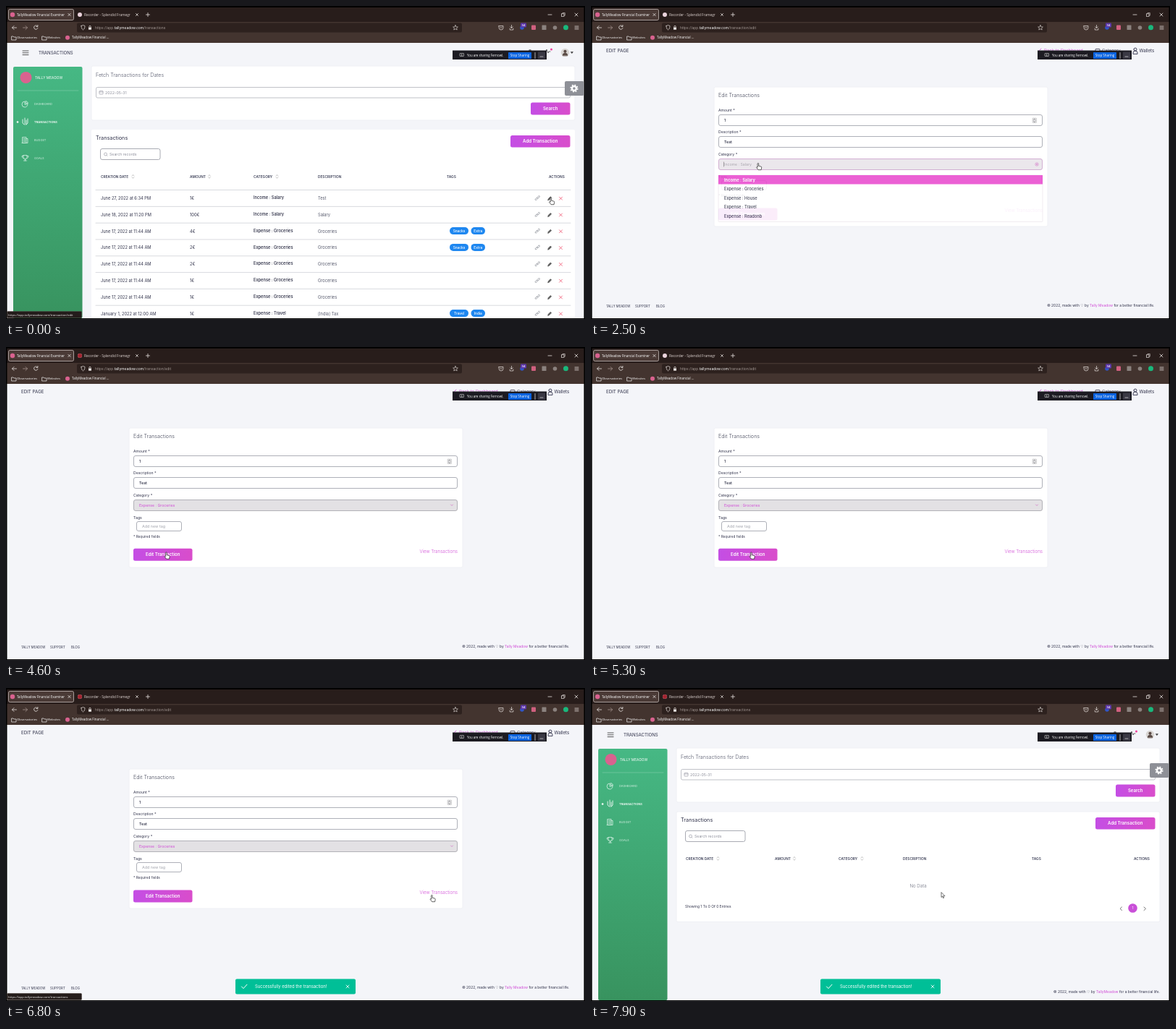
Write an HTML page that moves like this. It is 800 px wide and 433 px high and loops after 8 s.

```html
<!DOCTYPE html>
<html lang="en">
<head>
<meta charset="utf-8">
<title>Transactions</title>
<style>
html, body { margin: 0; width: 100%; height: 100%; overflow: hidden; background: #000; }
svg { display: block; width: 800px; height: 433px; }
text { font-family: Inter, sans-serif; white-space: pre; }
.ui text { font-family: "Open Sans", sans-serif; }
.heart { font-family: "DejaVu Sans", sans-serif; }
</style>
</head>
<body>
<svg id="stage" viewBox="0 0 800 433"></svg>
<script>
const INK = '#30324a', GREY = '#8d8f9b', PINK = '#d04bd6', LOGO = '#d9628f';

// y is the vertical middle of the text
const text = (x, y, s, size, fill = INK, weight = 400, anchor = 'start') =>
  `<text x="${x}" y="${y + size * .36}" font-size="${size}" fill="${fill}" font-weight="${weight}" text-anchor="${anchor}">${s}</text>`;
const rect = (x, y, w, h, fill, r = 0, stroke = 'none', sw = .8) =>
  `<rect x="${x}" y="${y}" width="${w}" height="${h}" rx="${r}" fill="${fill}" stroke="${stroke}" stroke-width="${sw}"/>`;
const dot = (x, y, r, fill) => `<circle cx="${x}" cy="${y}" r="${r}" fill="${fill}"/>`;
const ring = (x, y, r, stroke, sw = .6, extra = '') =>
  `<circle cx="${x}" cy="${y}" r="${r}" fill="none" stroke="${stroke}" stroke-width="${sw}" ${extra}/>`;
const line = (d, stroke, sw = .8, fill = 'none') =>
  `<path d="${d}" fill="${fill}" stroke="${stroke}" stroke-width="${sw}" stroke-linecap="round" stroke-linejoin="round"/>`;
const cross = (x, y, r, stroke, sw) =>
  line(`M${x - r} ${y - r}l${2 * r} ${2 * r}m0 ${-2 * r}l${-2 * r} ${2 * r}`, stroke, sw);
const group = (id, body, attrs = '') => `<g id="${id}" ${attrs}>${body}</g>`;
const card = (x, y, w, h) => rect(x, y, w, h, '#fff', 2, '#eff0f5', 1);
const button = (x, y, w, h, label) =>
  rect(x, y, w, h, 'url(#pink)', 2.5) + text(x + w / 2, y + h / 2, label, 6.1, '#fff', 600, 'middle');
const credit = (x, y, name) =>
  text(x, y, `© 2022, made with <tspan class="heart">♡</tspan> by <tspan fill="${PINK}">${name}</tspan> for a better financial life.`, 4.9, INK, 400, 'end');
const url = path =>
  text(123, 30, `https://app.<tspan fill="#fff">tallymeadow.com</tspan>/${path}`, 4.9, '#a39894');
const status = path =>
  rect(1.5, 422.5, 103, 9, '#241c1b', 1, '#4c403d', .5) + text(3, 427.5, 'https://app.tallymeadow.com/' + path, 4.2, '#eee');
const folder = x => line(`M${x} 42h2l1 1h3v4h-6z`, '#eee', .7);

function browser() {
  const c = '#e8e2e0';
  return rect(1.5, 2, 797, 20, '#281d1b') + rect(1.5, 22, 797, 29, '#43342f') +
    rect(3.5, 4.5, 90, 15, '#4a3a36', 2, '#d8cfcc', .7) +
    dot(9, 12, 3.2, LOGO) + text(15, 12, 'TallyMeadow Financial Examiner', 4.4, '#fff') + cross(87.5, 12, 1.6, c) +
    dot(102, 12, 3, '#ead3dc') + group('rec', dot(102, 12, 3, '#a32430')) +
    text(108, 12, 'Recorder - Splendid Framegr', 4.8, '#ddd3d0') + cross(181, 12, 1.5, c) +
    line('M196 9.5v5m-2.5-2.5h5', c) +
    line('M749 12h5', c) + rect(767.5, 10.8, 3.5, 3.5, 'none', 0, c, .7) + line('M769 10.5v-1h3.3v3.6h-1', c, .6) + cross(788, 12, 2, c) +
    line('M14.5 30h-6m2.5-2.5l-2.5 2.5l2.5 2.5', c) + line('M23.5 30h6m-2.5-2.5l2.5 2.5l-2.5 2.5', '#a4938e') +
    line('M43.5 28a2.7 2.7 0 1 0 .4 2.5m0-4v2h-2', c) +
    rect(98, 23.5, 532, 13, '#2d211e', 2) +
    line('M104 27.5l2.5-1l2.5 1c0 3-1 4.5-2.5 5.5c-1.5-1-2.5-2.5-2.5-5.5z', c, .7) +
    rect(114, 29.5, 4, 3.3, c, .5) + line('M114.8 29.5v-1a1.2 1.2 0 0 1 2.4 0v1', c, .7) +
    line('M621 26.5l1 2.3l2.4.2l-1.8 1.6l.6 2.4l-2.2-1.3l-2.2 1.3l.6-2.4l-1.8-1.6l2.4-.2z', c, .6) +
    line('M681 27.5h6v2.5a3 3 0 0 1-6 0zm1.5 1.7l1.5 1.4l1.5-1.4', c, .7) +
    line('M698.5 26.5v4m-1.7-1.7l1.7 1.7l1.7-1.7m-4 2.2v2h4.6v-2', c, .7) +
    dot(713, 30, 2.8, '#3155c6') + rect(711, 23.5, 8, 6, '#5a34a8', 1) + text(715, 26.5, '34', 4.3, '#fff', 600, 'middle') +
    rect(726, 26.5, 6, 6.5, '#d0607f', 1) + rect(740.5, 26.5, 6, 6.5, '#8b827f', .5) + dot(758.5, 30, 2.8, '#8b827f') +
    dot(773.5, 29.7, 3.5, '#19b87c') + line('M786 28h5m-5 2h5m-5 2h5', c, .7) +
    folder(8) + text(15, 43.8, 'Observatories', 4.3, '#fff') + folder(50) + text(57, 43.8, 'Websites', 4.3, '#fff') +
    dot(85, 43.8, 3, LOGO) + text(91, 43.8, 'TallyMeadow Financial ...', 4.5, '#fff');
}

function shareBar() {
  return rect(617, 61.5, 130, 12.5, '#1c1b22') + rect(627, 65.5, 5.5, 4, 'none', .5, '#ddd', .6) +
    line('M629.7 69v-2m-1 1l1-1l1 1', '#ddd', .5) + text(637, 68, 'You are sharing Fernowl.', 4.4, '#fff') +
    rect(694, 64, 32, 9, '#0a63e0', .5) + text(710, 68.5, 'Stop Sharing', 4.5, '#fff', 400, 'middle') +
    line('M731 64.5v8', '#eee', .7) + rect(735, 63.5, 10, 9.5, '#3a3944', .5) + line('M738 70h4', '#ddd', .7);
}

function sidebar() {
  const items = [['DASHBOARD', 135.5], ['TRANSACTIONS', 160.5], ['BUDGET', 185.5], ['GOALS', 210.5]];
  const icons = [
    'M30 136a4 4 0 1 1-4-4v4zm-2.5-4.5a4 4 0 0 1 3 3h-3z',
    'M23 157v5l2 2m1-9v9m2-6v6m2-8v6l-2 2',
    'M23 181.5h5v8h-5zm1 2h3m-3 2h3m-3 2h3m1-4h2v6h-8',
    'M24 206.5h5v3a2.5 2.5 0 0 1-5 0zm0 1h-2c0 2 1 3 2 3m5-3h2c0 2-1 3-2 3m-2.5 1v2.5m-2 0h4'];
  const tint = i => i == 1 ? '#fff' : '#d5efe2';
  return rect(10, 84, 95.5, 348, 'url(#green)', 2) + dot(27.5, 99, 8, LOGO) +
    text(40, 99, 'TALLY MEADOW', 4.8, '#fff') + line('M16 117h84', '#8dd0b0', .5) +
    items.map(([s, y], i) => text(39, y, s, 4, tint(i), i == 1 ? 600 : 400) + line(icons[i], tint(i))).join('') +
    dot(16, 160.5, 1.3, '#fff');
}

function row([date, amount, category, description, tags], i) {
  const y = 266 + i * 22.8;
  const pills = tags.map((s, k) => {
    const w = k ? 19.5 : 26, x = k ? 642.5 : 613;
    return rect(x, y - 5.5, w, 10, '#1e87f0', 5) + text(x + w / 2, y - .5, s, 4.8, '#fff', 500, 'middle');
  }).join('');
  return line(`M124 ${y + 11.4}h656`, '#c9cbd2', .7) + text(131, y, date, 5.7) + text(254, y, amount, 5.7) +
    text(342, y - .8, category, 5.7, '#20223a', 500) + text(431, y, description, 5.7, '#55586b') + pills +
    line(`M733.6 ${y + 1.5}l-1 1a1 1 0 0 1-1.3-1.3l2-2a1.2 1.2 0 0 1 1.7 0m0-1.5l1-1a1 1 0 0 1 1.3 1.3l-2 2a1.2 1.2 0 0 1-1.7 0`, '#777b86', .7) +
    line(`M748.8 ${y + 2.5}l.5-1.8l3-3l1.3 1.3l-3 3z`, '#444', .7, '#666') + cross(766.5, y + .2, 2, '#f0526e', .8);
}

function listPage() {
  const early = 'June 17, 2022 at 11:44 AM', food = 'Expense : Groceries', extra = ['Snacks', 'Extra'];
  const rows = [
    ['June 27, 2022 at 6:34 PM', '1€', 'Income : Salary', 'Test', []],
    ['June 18, 2022 at 11:20 PM', '100€', 'Income : Salary', 'Salary', []],
    [early, '4€', food, 'Groceries', extra], [early, '2€', food, 'Groceries', extra],
    [early, '2€', food, 'Groceries', []], [early, '1€', food, 'Groceries', []], [early, '1€', food, 'Groceries', []],
    ['January 1, 2022 at 12:00 AM', '1€', 'Expense : Travel', '[India] Tax', ['Travel', 'India']]];
  const heads = [[131, 'CREATION DATE'], [254, 'AMOUNT'], [342, 'CATEGORY'], [431, 'DESCRIPTION'], [609, 'TAGS'], [750, 'ACTIONS']];
  const sorters = [175.5, 281, 374.5].map(x =>
    line(`M${x - 1.3} 235l1.3-1.5l1.3 1.5m0 1.8l-1.3 1.5l-1.3-1.5`, '#999', .6)).join('');
  return url('transactions') + line('M23 62h8m-8 2.8h8m-8 2.8h8', '#444', .9) + text(45, 64.5, 'TRANSACTIONS', 6.1) +
    dot(724, 62, 2, '#777') + line('M743 64h2.5l1.5-4l2 5l1-2h2', '#555', .9) + dot(753.5, 60, 1.5, '#ef3f9b') +
    dot(772.5, 64.5, 5.8, '#d9d6d3') + dot(772.5, 62.8, 2.1, '#5a4a45') + line('M769 68.5a3.5 3.5 0 0 1 7 0z', '#5a4a45', .5, '#5a4a45') +
    line('M780.5 63.5h3l-1.5 2z', '#222', .4, '#222') +
    sidebar() + card(118, 83, 668, 75) + text(124, 95.5, 'Fetch Transactions for Dates', 7.1, '#55586b', 300) +
    rect(124.5, 112.5, 655, 14.5, '#fff', 2, '#a5a7b0', .7) + rect(129, 117.5, 5, 4.5, 'none', .5, GREY, .6) + line('M129 119h5', GREY, .6) +
    text(137, 119.8, '2022-05-31', 5.3, GREY) + button(725, 133.5, 54.5, 17, 'Search') +
    group('cardFull', rect(118, 171, 668, 261, '#fff', 2)) + group('cardEmpty', card(118, 171, 668, 152.5)) +
    text(124, 182.5, 'Transactions', 7.3) + button(697, 179, 82.5, 16.5, 'Add Transaction') +
    rect(130.5, 197.5, 82.5, 15, '#fff', 2.5, '#9496a0') + ring(137.5, 205, 2, GREY) +
    line('M139 206.5l1 1', GREY, .6) + text(143, 205.2, 'Search records', 5.2, GREY) +
    heads.map(([x, s]) => text(x, 236, s, 4.8, '#3d4058', 600)).join('') + sorters +
    group('rows', line('M124 254.5h656', '#c9cbd2', .7) + rows.map(row).join('')) +
    group('empty', text(452, 273.5, 'No Data', 6.1, GREY, 400, 'middle') + text(130, 302.5, 'Showing 1 To 0 Of 0 Entries', 4.9) +
      line('M733.5 303l-2.5 2.3l2.5 2.3', '#777', 1) + dot(748.5, 304.5, 6.3, '#c94fd8') +
      text(748.5, 304.5, '1', 5, '#fff', 400, 'middle') + line('M764 303l2.5 2.3l-2.5 2.3', '#777', 1) + credit(786, 420, 'TallyMeadow')) +
    rect(772, 104, 26.5, 20, '#8e9097', 2) +
    ring(785, 114, 3, '#fff', 2.4) + ring(785, 114, 4.8, '#fff', 1.6, 'stroke-dasharray="1.88"');
}

function editPage() {
  const box = (y, fill, stroke) => rect(176.5, y, 447, 15, fill, 2.5, stroke);
  const field = (y, label, value) => text(176, y - 6, label, 5.1) + box(y, '#fff', '#9a9ca6') +
    text(184, y + 7.7, value, 5.3, '#20223a', 500);
  const options = ['Income : Salary', 'Expense : Groceries', 'Expense : House', 'Expense : Travel', 'Expense : Readonb'];
  return url('transaction/edit') + text(21, 62, 'EDIT PAGE', 6.2) +
    line('M622 59l-3 3l3 3', PINK) + text(626, 62.3, 'Back to Dashboard', 6.1, PINK, 300) +
    rect(697, 59.5, 6, 6, 'none', .5, INK) + text(706, 62.3, 'Category', 6, INK, 300) +
    line('M749 66v-1a3 3 0 0 1 6 0v1zm1-6a2 2 0 1 1 4 0a2 2 0 0 1-4 0', INK, .9) + text(757.5, 62, 'Wallets', 6.1) +
    card(170, 112, 461, 193) + text(176, 123.5, 'Edit Transactions', 7.2, '#44475a', 300) +
    field(150.5, 'Amount *', '1') + rect(610, 155, 5.5, 6.5, '#e4e4e6', .5, '#aaa', .4) +
    line('M611.5 157.5l1.2-1.2l1.2 1.2m0 2l-1.2 1.2l-1.2-1.2', '#555', .6) +
    field(180.5, 'Description *', 'Test') + text(176, 205, 'Category *', 5.1) +
    group('picked', box(211.5, '#e3e1e4', '#a2a1a9') +
      `<text id="choice" x="184" y="221" font-size="5.2" fill="${PINK}"></text>` + line('M614.5 218l1.5 1.5l1.5-1.5', '#d479c8')) +
    group('focused', box(211.5, '#ebe7ec', '#c99fc9') + text(184, 219, 'Income : Salary', 5.2, '#a9a6ae') +
      line('M183.5 216v6', '#555', .5) + ring(616, 219, 2.2, '#d479c8') + cross(616, 219, .8, '#d479c8', .6)) +
    text(176, 236, 'Tags', 5.2) + rect(180.5, 241.5, 62, 13, '#fff', 2.5, '#9a9ca6') + text(188, 248, 'Add new tag', 5.4, '#a3a5ae') +
    text(176, 262.5, '* Required fields', 4.7) + group('submit', button(176, 279.5, 81.5, 17, 'Edit Transaction')) +
    text(624, 282.5, 'View Transactions', 6.2, PINK, 300, 'end') +
    group('menu', rect(176, 234, 448, 64.5, '#fff', 1, '#ebe5ec') + rect(176, 234, 448, 12.5, '#e94fd0') +
      options.map((s, i) => text(184, 240.5 + i * 12.5, s, 5.7, i ? '#33354a' : '#fff', i ? 500 : 700)).join('')) +
    text(21, 415, 'TALLY MEADOW', 4.2) + text(61, 415, 'SUPPORT', 4.4) + text(90, 415, 'BLOG', 4.5) + credit(778.5, 414.5, 'Tally Meadow');
}

const stage = document.getElementById('stage');
stage.innerHTML = `<defs>
  <linearGradient id="pink"><stop stop-color="#c44ee4"/><stop offset="1" stop-color="#d94dcb"/></linearGradient>
  <linearGradient id="green" x2="0" y2="1"><stop stop-color="#46b884"/><stop offset="1" stop-color="#38935f"/></linearGradient>
  </defs>` +
  rect(0, 0, 800, 433, '#000') + group('ui', browser(), 'class="ui"') + rect(1.5, 51, 797, 381, '#f4f5f9') +
  group('list', listPage()) + group('edit', editPage()) + group('share', shareBar(), 'class="ui"') +
  group('toast', rect(317, 402.5, 166, 21, '#00bf97', 2) + line('M325.5 413l2.5 2.7l5-5.5', '#fff', 1) +
    text(344, 413, 'Successfully edited the transaction!', 5.9, '#fff') + cross(472, 413, 2, '#fff', .8)) +
  group('editLink', status('transaction/edit'), 'class="ui"') + group('listLink', status('transactions'), 'class="ui"') +
  group('cursor',
    group('arrow', line('M0 0v6.5l1.5-1.4l1.1 2.6l1.1-.5l-1.1-2.5h2z', '#333', .7, '#fff')) +
    group('hand', line('M-1 .8a.8.8 0 0 1 1.7 0v3l3.3.8q.8.3.7 1.2l-.6 3.4h-4l-2.6-3.5q.3-1.3 1.5-.3z', '#222', .7, '#fff')) +
    group('beam', line('M-1-3h2m-1 0v6m-1 0h2', '#444', .6)));

const el = Object.fromEntries([...stage.querySelectorAll('[id]')].map(e => [e.id, e]));
const show = (id, on) => el[id].style.display = on ? '' : 'none';
const fade = (t, a, b) => Math.min(1, Math.max(0, (t - a) / (b - a)));

// pointer moves: start, end, x, y
const moves = [
  [0, 0, 753, 265.5], [430, 950, 182, 187], [1450, 2000, 231, 217.5], [2750, 3100, 232, 250],
  [3650, 4250, 221.5, 284], [5300, 5750, 220.5, 268], [6150, 6650, 588.5, 286.5], [7250, 7750, 484, 283]];

function pointerAt(t) {
  let [, , x, y] = moves[0];
  for (const [a, b, nx, ny] of moves.slice(1)) {
    const k = fade(t, a, b), e = k * k * (3 - 2 * k);
    x += (nx - x) * e;
    y += (ny - y) * e;
  }
  return [x, y];
}

function draw() {
  const t = performance.now() % 8000;
  const before = t < 420, after = t >= 7350, edit = !before && !after;
  show('list', !edit); show('edit', edit);
  for (const id of ['rows', 'cardFull']) show(id, before);
  for (const id of ['empty', 'cardEmpty']) show(id, after);
  show('rec', (t + 50) % 1200 >= 600);

  const open = t >= 2350 && t < 3450;
  show('focused', open); show('picked', !open);
  el.choice.textContent = t < 3000 ? 'Income : Salary' : 'Expense : Groceries';
  const menu = fade(t, 2330, 2520) * (1 - fade(t, 3400, 3580));
  show('menu', menu > 0);
  el.menu.setAttribute('opacity', menu);

  const [x, y] = pointerAt(t);
  const over = (x0, x1, y0, y1) => edit && x > x0 && x < x1 && y > y0 && y < y1;
  const onButton = over(176, 257, 279, 297), onLink = over(572, 624, 279, 289);
  const onSelect = t > 1400 && over(176, 624, 211, 226);
  const beam = t < 1700 && over(176, 624, 181, 196);
  const hand = before || onButton || onLink || onSelect || (open && y > 234);
  show('beam', beam); show('hand', hand); show('arrow', !beam && !hand);
  el.cursor.setAttribute('transform', `translate(${x} ${y})`);
  el.submit.setAttribute('transform', `translate(0 ${onButton ? -.7 : 0})`);
  show('editLink', before); show('listLink', onLink);

  show('toast', t > 5750);
  el.toast.setAttribute('opacity', fade(t, 5750, 6150));
  requestAnimationFrame(draw);
}
draw();
</script>
</body>
</html>
```
